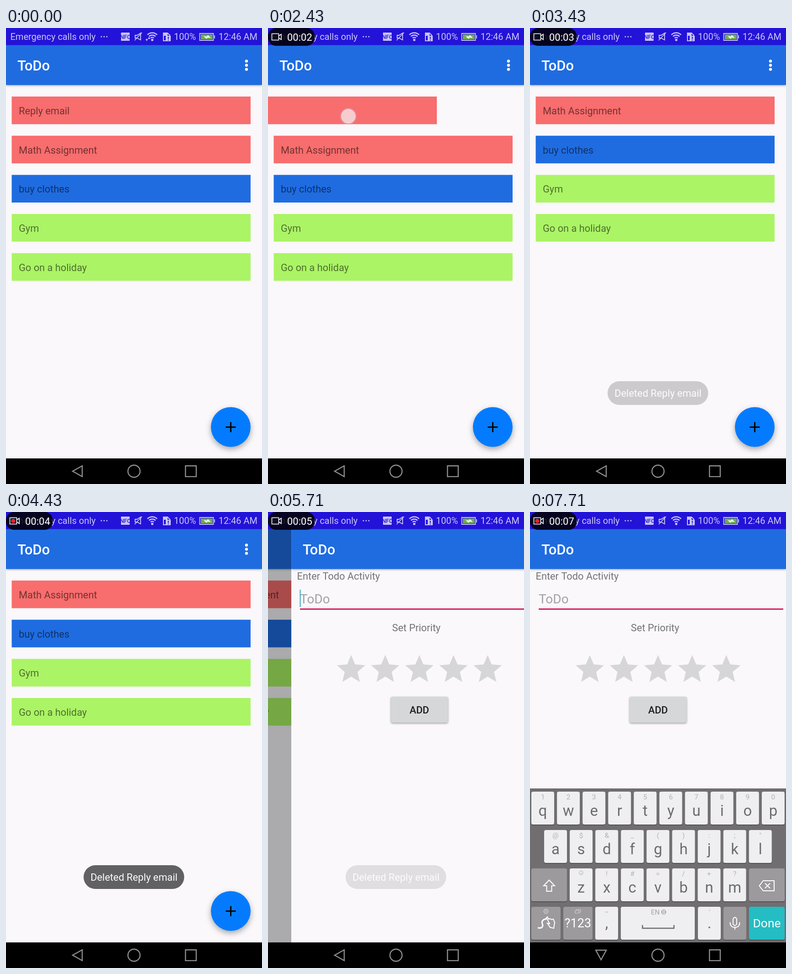
Write an HTML page with a canvas that moves like this. It is 561x998 px and loops after 8 s.

```html
<!DOCTYPE html>
<html lang="en">
<head>
<meta charset="utf-8">
<title>ToDo</title>
<style>
html, body { margin: 0; width: 100%; height: 100%; overflow: hidden; background: #faf8fb; }
canvas { display: block; }
</style>
</head>
<body>
<canvas width="561" height="998"></canvas>
<script>
const W = 561, BODY_TOP = 37, BODY_BOTTOM = 942, LOOP = 8000;
const BG = '#faf8fb', BLUE = '#1f6ce1', ICON = '#c9c4f5';
const ctx = document.querySelector('canvas').getContext('2d');

const ITEMS = [
  ['Reply email', '#f86d6d'], ['Math Assignment', '#f86d6d'], ['buy clothes', BLUE],
  ['Gym', '#abf465'], ['Go on a holiday', '#abf465']
];
const STAR = 'M12 17.27 18.18 21l-1.64-7.03L22 9.24l-7.19-.61L12 2 9.19 8.63 2 9.24l5.46 4.73L5.82 21z';
// When the recording light comes on within each second.
const LIGHT_ON = [570, 430, 570, 570, 430, 1000, 430, 430];

// Piecewise linear value through [time, value] points.
function at(t, points) {
  let [t0, v0] = points[0];
  for (const [t1, v1] of points) {
    if (t < t1) return t <= t0 ? v0 : v0 + (v1 - v0) * (t - t0) / (t1 - t0);
    [t0, v0] = [t1, v1];
  }
  return v0;
}

// Progress from 0 to 1 that slows down towards the end.
function decelerate(t, start, duration, power = 3) {
  const p = Math.min(Math.max((t - start) / duration, 0), 1);
  return 1 - (1 - p) ** power;
}

function text(s, x, y, size, color, { weight = 400, align = 'left' } = {}) {
  ctx.font = `${weight} ${size}px Roboto, sans-serif`;
  ctx.textAlign = align;
  ctx.fillStyle = color;
  ctx.fillText(s, x, y);
}

function rect(x, y, w, h, color, r = 0) {
  ctx.fillStyle = color;
  ctx.beginPath();
  ctx.roundRect(x, y, w, h, r);
  ctx.fill();
}

function disc(x, y, r, color) {
  ctx.fillStyle = color;
  ctx.beginPath();
  ctx.arc(x, y, r, 0, 7);
  ctx.fill();
}

function ring(x, y, r, color, width) {
  ctx.strokeStyle = color;
  ctx.lineWidth = width;
  ctx.beginPath();
  ctx.arc(x, y, r, 0, 7);
  ctx.stroke();
}

function line(d, color, width = 2) {
  ctx.strokeStyle = color;
  ctx.lineWidth = width;
  ctx.stroke(new Path2D(d));
}

function shape(d, color) {
  ctx.fillStyle = color;
  ctx.fill(new Path2D(d));
}

function group(draw) {
  ctx.save();
  draw();
  ctx.restore();
}

function shadowed(blur, dy, color, draw) {
  group(() => {
    ctx.shadowBlur = blur;
    ctx.shadowOffsetY = dy;
    ctx.shadowColor = color;
    draw();
  });
}

function toolbar() {
  shadowed(5, 1.5, 'rgba(0,0,0,.4)', () => rect(0, BODY_TOP, W, 87.7, BLUE));
  text('ToDo', 25, 93, 31, '#fff', { weight: 500 });
}

function touch(x, y, alpha) {
  disc(x, y, 18.5, `rgba(190,190,220,${alpha * .45})`);
  disc(x, y, 16, `rgba(255,238,238,${alpha})`);
}

function listScreen(t) {
  rect(0, BODY_TOP, W, 905, BG);
  toolbar();
  for (const y of [72.5, 81.5, 90.5]) disc(527, y, 3.2, '#fff');

  // The finger drags the first row past the middle, then the row flies off.
  const swipe = at(t, [[1290, 0], [2430, -166], [3000, -285], [3290, -560]]);
  const deleted = t >= 3430 ? 1 : 0;
  ITEMS.slice(deleted).forEach(([label, color], i) => {
    const x = i || deleted ? 0 : swipe;
    const y = 150 + 85.7 * i;
    rect(12.5 + x, y, 523.5, 60.5, color);
    text(label, 28 + x, y + 38.8, 21.8, 'rgba(0,0,0,.54)');
  });

  const pressed = t >= 5290 && t < 5710;
  shadowed(13, 5, 'rgba(0,0,0,.34)', () => disc(492.5, 873.3, 43.5, pressed ? '#1266db' : '#047bff'));
  line('M481.5 873.5h22M492.5 862.5v22', '#000', 3);

  if (t >= 1290 && t <= 3000) touch(347 + swipe * 1.03, 169 - swipe * .145, .68);
  if (t >= 5290 && t < 5570) disc(506.5, 884, 17, 'rgba(200,215,225,.42)');
}

function formScreen(t) {
  rect(0, BODY_TOP, W, 905, BG);
  toolbar();
  text('Enter Todo Activity', 12.5, 148.3, 21.8, '#747375');
  text('ToDo', 19, 200, 28, '#a2a1a3');
  rect(19, 211, 536, 3, '#d6215f');
  const phase = t % 1000;
  if (t < 6000 || (phase >= 290 && phase < 710)) rect(18.5, 170, 2, 38, '#35aabd');
  text('Set Priority', 274, 261, 21.8, '#747375', { align: 'center' });
  for (let i = 0; i < 5; i++) group(() => {
    ctx.translate(93.8 + 74.8 * i, 306.8);
    ctx.scale(3.1, 3.1);
    shape(STAR, '#d6d6d8');
  });
  shadowed(4, 1.5, 'rgba(0,0,0,.4)', () => rect(218.5, 404.5, 124.5, 56.5, '#d5d7d8', 3));
  text('ADD', 280.5, 441, 21.8, '#1e1e1f', { weight: 500, align: 'center' });
}

function key(x, row, w, label, hint, color = '#efeef0', ink = '#6c6b6d', size = 33, baseline = 53) {
  const y = 612 + 84 * row, mid = x + w / 2, center = { align: 'center' };
  rect(x, y + 2, w, 72, '#555356', 4);
  rect(x, y, w, 72, color, 4);
  text(label, mid, y + baseline, size, ink, center);
  text(hint, mid, y + 16.5, 15.5, '#b2b1b3', center);
}

function keyboard() {
  const GREY = '#9c9a9d', pitch = 56.1;
  rect(0, 605, W, 337, '#706e71');
  [['qwertyuiop', '1234567890', 3], ['asdfghjkl', '@$&_():;"', 31], ['zxcvbnm', ' !#=/+?', 87]]
    .forEach(([letters, hints, x], row) =>
      [...letters].forEach((c, i) => key(x + pitch * i, row, 50, c, hints[i])));
  key(3, 2, 78, '', '', GREY);
  key(480, 2, 78, '', '', GREY);
  key(3, 3, 64, '', '', GREY);
  key(73, 3, 64, '?123', '', GREY, '#fff', 27, 45);
  key(143, 3, 50, ',', '–', undefined, undefined, 33, 47);
  key(199, 3, 162, '', '');
  key(368, 3, 50, '.', "'", undefined, undefined, 33, 47);
  key(424, 3, 50, '', '', GREY);
  key(480, 3, 78, 'Done', '', '#23bdc3', '#fff', 26.5, 45);

  // Smiley, gear, stacked windows and globe hints
  ring(112, 789.5, 4.5, '#b2b1b3', 1);
  line('M109.5 790.5q2.5 3 5 0M110 787.5h1M113 787.5h1', '#b2b1b3', 1);
  ring(35, 874, 4.6, '#d0ced1', 1.6);
  ring(35, 874, 1.6, '#d0ced1', 1);
  line('M99 872h8v6h-8zM102 872v-2h9v6h-4', '#d0ced1', 1.2);
  text('EN', 265, 881, 15, '#a3a2a4');
  ring(293, 875.5, 4.8, '#a3a2a4', 1.2);
  line('M288 875.5h10M293 871v9M290 872q-2 3.5 0 7M296 872q2 3.5 0 7', '#a3a2a4', 1);

  line('M246.5 904v7h69v-7', '#6c6b6d', 2.5);
  line('M42 805.5 54 818h-6.5v12h-11v-12H30z', '#fff', 2);
  line('M502.5 818l8.5-11h24v22h-24zM515 812.5l11 11M526 812.5l-11 11', '#fff', 2);
  // Gesture typing: a swoosh and a pointing hand
  line('M17 910c11 2 12-4 10-9s1-10 11-11', '#fff', 3);
  line('M36 888l7 13-5-1 6 9 8 2 2-13-3-7-4 1-3-2-3 1-3-5z', '#fff', 2);
  line('M445 891q4-8 8 0v11q-4 6-8 0zM438.5 898q0 11 10.5 11t10.5-11M449 909v5', '#fff', 2);
}

// The label stays light while its pill fades over the pale page.
function toast(alpha) {
  if (!alpha) return;
  rect(170, 773, 220.5, 52, `rgba(97,96,98,${alpha})`, 26);
  text('Deleted Reply email', 280.5, 807.3, 21.8, '#fcfbfd', { align: 'center' });
}

function statusBar(arrows) {
  rect(0, 0, W, 37.4, '#2313d8');
  text('Emergency calls only', 9.5, 26, 20, ICON);
  for (const x of [209, 215, 221]) disc(x, 19, 1.5, ICON);

  rect(252, 10, 19, 18, ICON, 1);
  text('NFC', 261.5, 24, 12, '#2313d8', { weight: 500, align: 'center' });

  line('M283 16h4l8-5v15l-8-4h-4zM282 27l16-17', ICON, 1.8);

  for (const r of [5, 10, 15]) {
    ctx.strokeStyle = ICON;
    ctx.lineWidth = 2.6;
    ctx.beginPath();
    ctx.arc(320.5, 25.5, r, -2.36, -.78);
    ctx.stroke();
  }
  disc(320.5, 26, 2.6, ICON);
  if (arrows) shape('M306 24h5l-2.5 5zM311 24l2.5-5 2.5 5z', ICON);

  line('M345 11h9l5 5v12h-14z', ICON, 2);
  rect(345, 11, 9, 6, ICON);
  rect(350, 17, 11, 12, ICON, 1);
  rect(354.7, 19, 2, 5, '#2313d8');
  rect(354.7, 25.5, 2, 2, '#2313d8');

  text('100%', 368, 26, 20, ICON);
  line('M424.5 12h30v15h-30zM457 16v7', ICON, 1.8);
  rect(427, 14, 25.5, 11, '#6fae4e');
  shape('M433 18l8 .5 1-3 7 6-8-.5-1 3z', '#fff');
  text('12:46 AM', 551, 26, 20, ICON, { align: 'right' });
}

function recorder(t) {
  rect(0, 0, 102.5, 39, 'rgba(0,0,0,.85)', 18);
  line('M8.5 12.5h15v14h-15zM23.5 17.5l5.5-4v12l-5.5-4', '#fff', 1.6);
  const second = Math.floor(t / 1000);
  if (t % 1000 >= LIGHT_ON[second]) disc(15.8, 19.5, 4.6, '#f0202c');
  text('00:0' + second, 42, 27.5, 22, '#fff');
}

function navBar(typing) {
  rect(0, BODY_BOTTOM, W, 56, '#000');
  line(typing ? 'M144.2 959h23l-11.5 21z' : 'M146 970 167 958.3v23.4z', '#8e8e8e', 2.4);
  ring(280.5, 970, 13.3, '#8e8e8e', 2.4);
  line('M393.3 958.3h23.6v23.6h-23.6z', '#8e8e8e', 2.4);
}

function draw(t) {
  const entered = decelerate(t, 5545, 300);
  const formX = W * (1 - entered);

  group(() => {
    ctx.translate(-193 * entered, 0);
    listScreen(t);
  });
  if (entered) {
    rect(0, BODY_TOP, formX, 905, `rgba(0,0,0,${.35 * entered})`);
    group(() => {
      ctx.beginPath();
      ctx.rect(formX, BODY_TOP, W, 905);
      ctx.clip();
      ctx.translate(formX, 0);
      formScreen(t);
    });
  }

  // The keyboard fades in while rising a short way.
  const shown = decelerate(t, 6080, 200, 2);
  if (shown) group(() => {
    ctx.globalAlpha = shown;
    ctx.translate(0, 50 * (1 - shown));
    keyboard();
  });

  toast(at(t, [[3290, 0], [3430, .3], [3570, .7], [3860, 1], [5430, 1], [5710, .17], [5860, 0]]));
  statusBar(t < 140);
  navBar(t >= 6140);
  if (t >= 140) recorder(t);
}

function tick() {
  const step = Math.floor((performance.now() % LOOP + 5) * 7 / 1000);
  draw(Math.min(Math.round(step * 100 / 7) * 10, LOOP - 140));
  requestAnimationFrame(tick);
}
tick();
</script>
</body>
</html>
```
